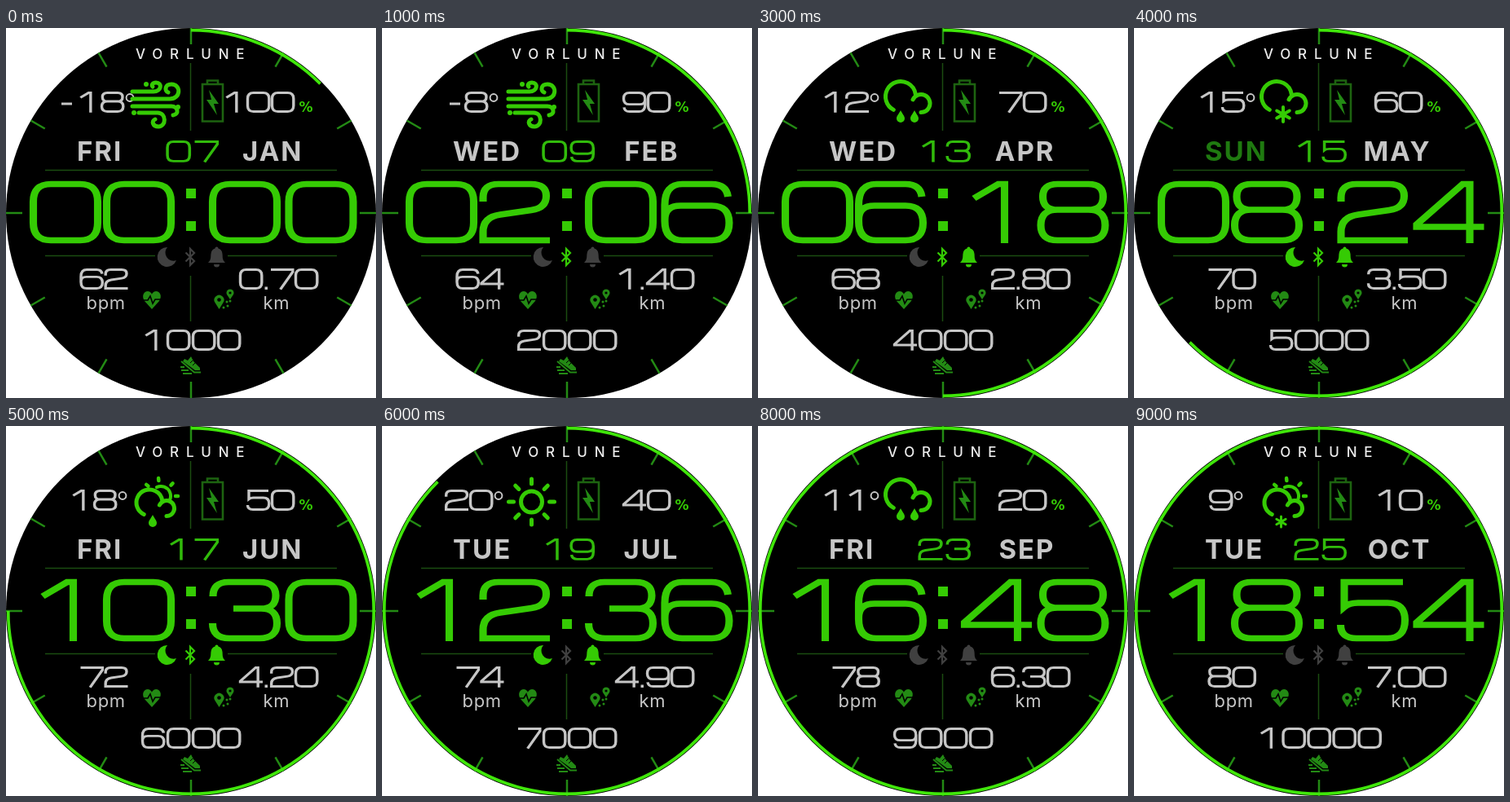
An HTML page with a canvas for the animation above (10000 ms loop, 454x454 px).

```html
<!DOCTYPE html>
<html lang="en">
<head>
<meta charset="utf-8">
<title>Watch face</title>
<style>
  html, body { margin: 0; width: 100%; height: 100%; overflow: hidden; background: #fff; }
  canvas { display: block; width: 454px; height: 454px; }
</style>
</head>
<body>
<canvas id="face" width="454" height="454" role="img" aria-label="Digital watch face"></canvas>
<script>
const ctx = document.getElementById('face').getContext('2d');
const C = 227, STEP = 1000, COUNT = 10;
const GREEN = '#35cb04', BRIGHT = '#40e60a', DIM = '#238a14', DARK = '#1d6310';
const LINE = '#1b4c10', GREY = '#c6c6c6', OFF = '#404040', SUNDAY = '#1f7a10';
const FONT = 'Inter, "DejaVu Sans", sans-serif';

const DAYS = ['SUN', 'MON', 'TUE', 'WED', 'THU', 'FRI', 'SAT'];
const MONTHS = ['JAN', 'FEB', 'MAR', 'APR', 'MAY', 'JUN', 'JUL', 'AUG', 'SEP', 'OCT'];
const TEMPS = [-18, -8, -13, 12, 15, 18, 20, 27, 11, 9];
const SKY = ['wind', 'wind', 'wind', 'rain', 'snow', 'sunRain', 'sun', 'sunRain', 'rain', 'sunSnow'];
// Lit status icons: m = moon, b = bluetooth, a = alarm
const LIT = ['', 'b', 'b', 'ba', 'mba', 'mba', 'ma', 'm', '', ''];

// The pen is wider than tall, so upright strokes are heavier than level ones
const PEN = 1.2;

// Wide numerals as centre lines in an 88 x 78 cell
const DIGITS = [
  'M26 4.5H62Q83.5 4.5 83.5 26V52Q83.5 73.5 62 73.5H26Q4.5 73.5 4.5 52V26Q4.5 4.5 26 4.5Z',
  'M16 22L46 4.5H53.5V77',
  'M5 26V21Q5 4.5 24 4.5H64Q82.5 4.5 82.5 19Q82.5 34 64 36.5L26 42Q5 45 5 63V73.5H87',
  'M5 22Q5 4.5 24 4.5H62Q82 4.5 82 21Q82 37 64 37H30M64 37Q83.5 37 83.5 55Q83.5 73.5 62 73.5H25Q4.5 73.5 4.5 55',
  'M87 57H4.5V54L61 4.5H69.5V77',
  'M81 4.5H9V35Q15 30 26 30H62Q83.5 30 83.5 51Q83.5 73.5 62 73.5H24Q4.5 73.5 4.5 57',
  'M82 20Q80 4.5 62 4.5H26Q4.5 4.5 4.5 30V50Q4.5 73.5 26 73.5H62Q83.5 73.5 83.5 52Q83.5 31 62 31H24Q4.5 31 4.5 48',
  'M3 4.5H83.5V13L38 77',
  'M25 4.5H63Q81 4.5 81 20Q81 36 63 36H25Q7 36 7 20Q7 4.5 25 4.5ZM25 36H63Q83.5 36 83.5 55Q83.5 73.5 63 73.5H25Q4.5 73.5 4.5 55Q4.5 36 25 36Z',
  'M6 58Q8 73.5 26 73.5H62Q83.5 73.5 83.5 48V28Q83.5 4.5 62 4.5H26Q4.5 4.5 4.5 26Q4.5 47 26 47H64Q83.5 47 83.5 30'
].map(d => {
  const path = new Path2D();
  path.addPath(new Path2D(d), new DOMMatrix([1 / PEN, 0, 0, 1, 0, 0]));
  return path;
});

function stroke(path, color, width) {
  ctx.strokeStyle = color;
  ctx.lineWidth = width;
  ctx.stroke(typeof path === 'string' ? new Path2D(path) : path);
}

function fill(path, color) {
  ctx.fillStyle = color;
  ctx.fill(new Path2D(path));
}

function dot(x, y, r, color) {
  ctx.fillStyle = color;
  ctx.beginPath();
  ctx.arc(x, y, r, 0, 7);
  ctx.fill();
}

function arc(x, y, r, from, to, color, width) {
  ctx.strokeStyle = color;
  ctx.lineWidth = width;
  ctx.beginPath();
  ctx.arc(x, y, r, from * Math.PI / 180, to * Math.PI / 180);
  ctx.stroke();
}

function rays(x, y, from, to, angles, color, width) {
  ctx.strokeStyle = color;
  ctx.lineWidth = width;
  ctx.beginPath();
  for (const a of angles) {
    const c = Math.cos(a * Math.PI / 180), s = Math.sin(a * Math.PI / 180);
    ctx.moveTo(x + c * from, y + s * from);
    ctx.lineTo(x + c * to, y + s * to);
  }
  ctx.stroke();
}

const turn = n => Array.from({ length: n }, (_, i) => i * 360 / n);
const pad = n => String(n).padStart(2, '0');

function digit(d, x, y, scale, color, width) {
  ctx.save();
  ctx.translate(x, y);
  ctx.scale(scale * PEN, scale);
  stroke(DIGITS[d], color, width);
  ctx.restore();
}

function number(value, x, y, pitch = 30, color = GREY, scale = 1 / 3) {
  [...String(value)].forEach((d, i) => digit(d, x + i * pitch, y, scale, color, 8.5));
}

function text(s, x, y, font, color, spacing = 0, align = 'left') {
  ctx.font = font;
  ctx.fillStyle = color;
  ctx.textAlign = align;
  ctx.letterSpacing = spacing + 'px';
  ctx.fillText(s, x, y);
  ctx.letterSpacing = '0px';
}

function drop(x, y) {
  fill(`M${x} ${y - 8}C${x + 2} ${y - 4} ${x + 5} ${y - 1} ${x + 5} ${y + 2}A5 5 0 0 1 ${x - 5} ${y + 2}C${x - 5} ${y - 1} ${x - 2} ${y - 4} ${x} ${y - 8}Z`, GREEN);
}

function clouds() {
  arc(175, 84, 18.5, 118, 352, GREEN, 5);
  arc(200, 92.5, 11, 205, 450, GREEN, 5);
}

function sunCloud() {
  arc(190, 86, 12, -115, 25, GREEN, 4);
  rays(189, 86, 19, 22, [-140, -95, -45, 0], GREEN, 4.5);
  arc(176, 94, 16, 115, 352, GREEN, 5);
  arc(197, 101, 9.5, 205, 450, GREEN, 5);
}

const weather = {
  wind() {
    stroke('M155 78H181C191 78 192 67 184 67C180 67 178 70 180 72', GREEN, 5);
    stroke('M155 87H201C215 87 215 69 203 69C195 69 194 77 199 79', GREEN, 5);
    stroke('M155 96H203C211 96 213 106 205 107', GREEN, 5);
    stroke('M163 104H186C197 104 197 121 187 121C180 121 178 114 183 112', GREEN, 5);
    for (const [x, y] of [[172, 69], [211, 97], [157, 104]]) dot(x, y, 3, GREEN);
  },
  snow() {
    clouds();
    rays(183, 106, 0, 9, turn(6).map(a => a + 30), GREEN, 4);
  },
  rain() {
    clouds();
    drop(175, 109);
    drop(192, 109);
  },
  sun() {
    arc(183.5, 93, 13, 0, 360, GREEN, 5);
    rays(183.5, 93, 22, 28, turn(8), GREEN, 5);
  },
  sunRain() {
    sunCloud();
    drop(180, 117);
  },
  sunSnow() {
    sunCloud();
    rays(180.5, 117.5, 0, 6.5, turn(6).map(a => a + 30), GREEN, 3);
  }
};

function drawBase() {
  ctx.fillStyle = '#fff';
  ctx.fillRect(0, 0, 454, 454);
  dot(C, C, 227, '#000');
  ctx.lineCap = 'butt';
  rays(C, C, 207, 227, turn(12), DIM, 2.5);
  stroke('M48 174.5H406M48 279.5H183M272 279.5H406M226.5 43V126M226.5 304V360', LINE, 1.5);
  text('VORLUNE', 159, 37.5, '500 17px ' + FONT, '#ececec', 8.8);
}

function drawBattery() {
  stroke('M241 69H266V114.5H241ZM247 69V64.5H260V69', DARK, 2.6);
  fill('M249 76L261 93H255L259 107L246 88H252Z', DIM);
}

function drawSmallIcons() {
  fill('M179 345L170 335C166 329 169 323 174 323C177 323 179 326 179 327C179 326 181 323 184 323C189 323 192 329 188 335Z', DIM);
  stroke('M167 334H174L177 329L180 338L183 333H191', '#000', 1.6);

  fill('M261.500 345L256.500 337A6 6 0 1 1 266.500 337Z', DIM);
  dot(261.5, 333.5, 2.3, '#000');
  fill('M275 333L271 327A4.500 4.500 0 1 1 279 327Z', DIM);
  dot(275, 325, 1.6, '#000');
  for (const [x, y] of [[267, 343], [272, 341], [271, 336], [275, 335]]) dot(x, y, 1.5, DIM);

  fill('M219 406L223 408L227 403L230 409L238 417V420H232L217 409Z', DIM);
  stroke('M215 409L231 422.500H239M214 416H219M215 420H224M217 424H228', DIM, 1.8);
  stroke('M226 411L229 408M229 414L232 411', '#000', 1);
}

function drawStatus(lit) {
  const color = key => lit.includes(key) ? GREEN : OFF;
  fill('M198 269A12 12 0 1 0 209 285A10 10 0 0 1 198 269Z', color('m'));
  stroke('M220.500 275.500L231 286L226 291V271L231 276L220.500 286.500', color('b'), 2.2);
  fill('M248 288C252 284 251 281 251.500 277C252 273 254 271 256.500 270.500A2 2 0 0 1 260.500 270.500C263 271 265 273 265.500 277C266 281 265 284 269 288ZM255 290H262A3.500 3.500 0 0 1 255 290Z', color('a'));
}

function drawTemp(value) {
  const n = String(Math.abs(value)).length, minus = value < 0;
  const x = 113 - (30 * n + 12 + (minus ? 18 : 0)) / 2;
  const start = x + (minus ? 18 : 0);
  if (minus) stroke(`M${x} 93H${x + 13}`, GREY, 3);
  number(Math.abs(value), start, 78);
  arc(start + 30 * n + 6, 85.5, 4.4, 0, 360, GREY, 2);
}

function drawClock(k) {
  const digits = pad(2 * k) + pad(6 * k);
  [29, 119, 249, 342.5].forEach((x, i) => digit(digits[i], x, 187, 1, GREEN, 7.6));
  ctx.fillStyle = GREEN;
  ctx.fillRect(221, 197, 12, 12);
  ctx.fillRect(221, 237, 12, 12);
}

function drawDate(k) {
  const day = 7 + 2 * k;
  const name = DAYS[new Date(2022, k, day).getDay()];
  const font = '700 33px ' + FONT;
  text(name, 87, 162.5, font, name === 'SUN' ? SUNDAY : GREY, 2);
  number(pad(day), 196.5, 138, 34, '#31bb0b', 0.345);
  text(MONTHS[k], 364.5, 162.5, font, GREY, 2, 'right');
}

function drawReadings(k) {
  const battery = String(100 - 10 * k);
  number(battery, 355 - 30 * battery.length, 78);
  text('%', 359.5, 102.5, 'bold 17px "DejaVu Sans", sans-serif', GREEN);

  number(62 + 2 * k, 90.5, 295);
  text('bpm', 98.5, 345, '22px ' + FONT, GREY, 0.7);

  const [whole, part] = (0.7 * (k + 1)).toFixed(2).split('.');
  number(whole, 286, 295);
  ctx.fillStyle = GREY;
  ctx.fillRect(317.5, 317.5, 3.5, 3.5);
  number(part, 324, 295);
  text('km', 315.5, 345, '22px ' + FONT, GREY, 0.7);

  const steps = String(1000 * (k + 1));
  number(steps, 228 - 15.5 * steps.length, 370, 31);
}

function draw(now) {
  const k = Math.floor(now / STEP) % COUNT;
  drawBase();
  arc(C, C, 224.3, -90, -90 + 45 * Math.min(k + 1, 8), BRIGHT, 3.7);
  drawBattery();
  drawSmallIcons();
  drawTemp(TEMPS[k]);
  ctx.lineCap = 'round';
  weather[SKY[k]]();
  ctx.lineCap = 'butt';
  drawDate(k);
  drawClock(k);
  drawStatus(LIT[k]);
  drawReadings(k);
}

const begin = performance.now();
function tick() {
  draw(performance.now() - begin);
  requestAnimationFrame(tick);
}
tick();
</script>
</body>
</html>
```
